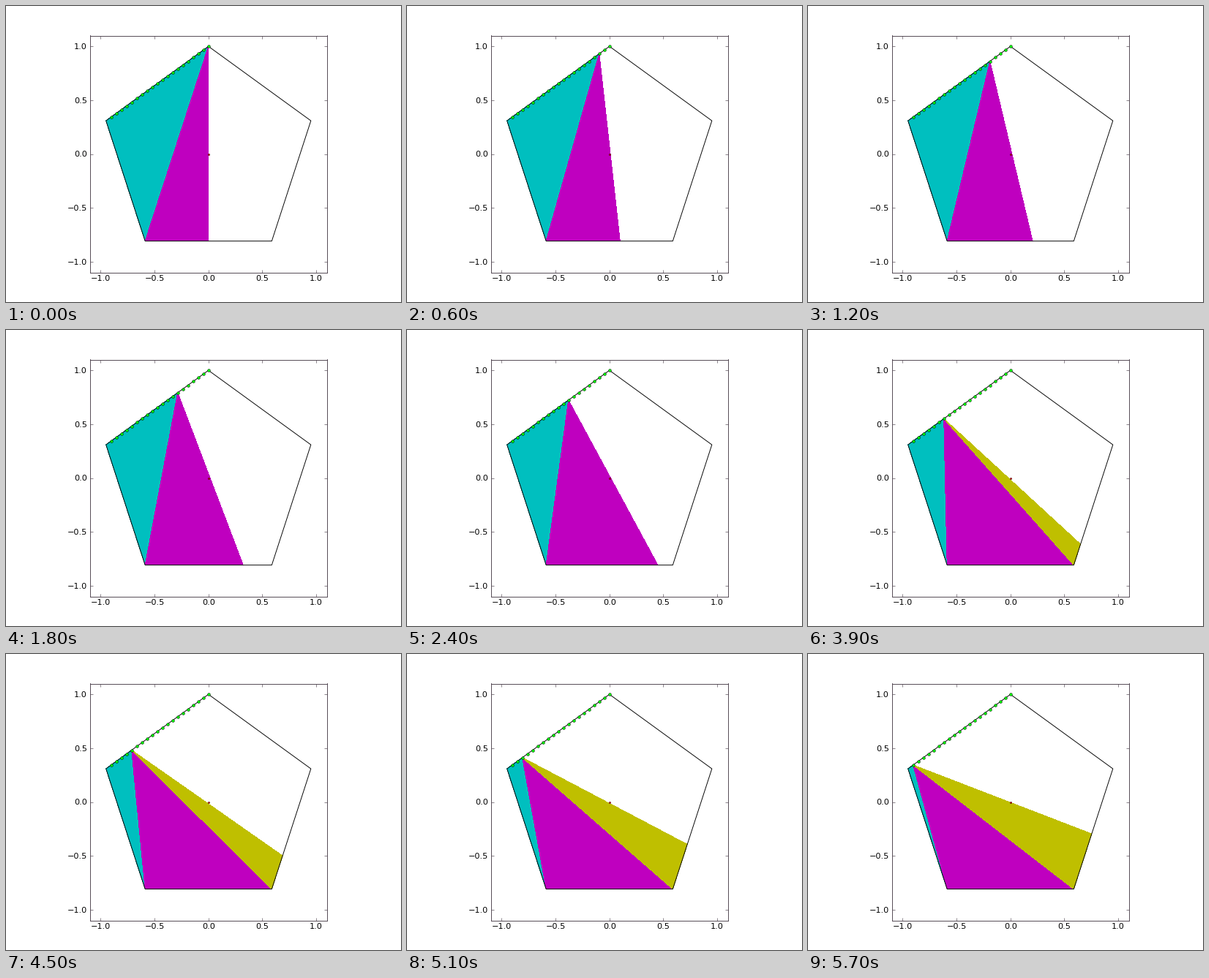
Write a matplotlib script that moves like this. It is 540 by 405 pixels and loops after 6 s.

```python
import numpy as np
import matplotlib.pyplot as plt
from matplotlib.animation import FuncAnimation

STEPS = 20
INTERVAL = 300
TICKS = np.arange(-2, 3) / 2
FRAME = "#4f444f"

plt.rcParams.update({"font.family": "DejaVu Sans", "font.size": 12})

# Regular pentagon, counter-clockwise from the top
angles = np.pi / 2 + 2 * np.pi * np.arange(5) / 5
V = np.column_stack([np.cos(angles), np.sin(angles)])
HALF = 5 / 4 * np.sin(2 * np.pi / 5)


def lerp(a, b, t):
    return a + (b - a) * t


def area(a, b, c):
    u, v = b - a, c - a
    return abs(u[0] * v[1] - u[1] * v[0]) / 2


def slices(p):
    """Triangles with apex p that together cover half of the pentagon."""
    rest = HALF
    result = []
    for a, b in zip(V[1:4], V[2:5]):
        full = area(p, a, b)
        t = min(1.0, max(0.0, rest / full))
        result.append(np.array([p, a, lerp(a, b, t)]))
        rest -= t * full
    return result


fig = plt.figure(figsize=(8, 6), dpi=67.5, facecolor="white")
ax = fig.add_axes([0.125, 0.1, 0.775, 0.8])
ax.set_aspect("equal")
ax.set_xlim(-1.1, 1.1)
ax.set_ylim(-1.1, 1.1)
ax.set_xticks(TICKS)
ax.set_yticks(TICKS)
ax.tick_params(direction="in", length=4, width=0.7, pad=4, color=FRAME,
               labelcolor="black", top=True, right=True)
for spine in ax.spines.values():
    spine.set(linewidth=1, color=FRAME)

parts = [ax.fill([0, 0, 0], [0, 0, 0], color=c, lw=0, antialiased=False,
                 zorder=1)[0]
         for c in ("#00bfbf", "#bf00bf", "#bfbf00")]
ax.fill(*V.T, fill=False, edgecolor="black", lw=1, zorder=2)

points = np.array([lerp(V[0], V[1], k / STEPS) for k in range(STEPS)])
ax.plot(*points.T, "o", ms=4, mfc="#00ff00", mec="black", mew=0.5, zorder=3)
ax.plot(0, 0, "o", ms=2.4, mfc="red", mec="black", mew=0.5, zorder=3)


def update(k):
    for part, tri in zip(parts, slices(points[k])):
        part.set_xy(tri)
    return parts


anim = FuncAnimation(fig, update, frames=STEPS, interval=INTERVAL,
                     init_func=lambda: update(0), repeat=True, repeat_delay=0)
plt.show()
```
